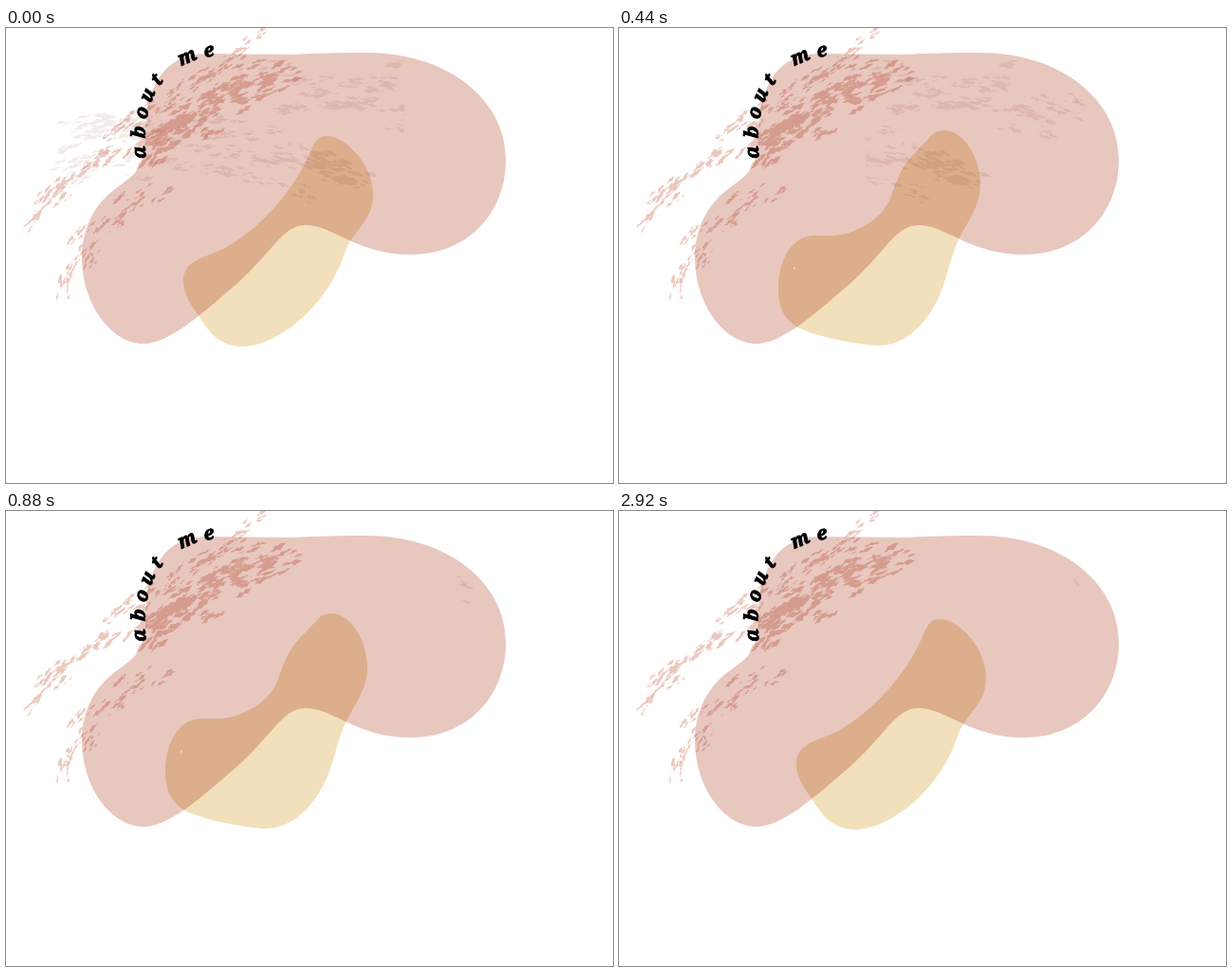
These frames come from a looping animation (640x480 px, 2.96 s). An HTML page with a canvas:

```html
<!DOCTYPE html>
<html lang="en">
<head>
<meta charset="utf-8">
<title>about me</title>
<style>
  html, body { margin: 0; width: 100%; height: 100%; overflow: hidden; background: #fff; }
  canvas { display: block; }
</style>
</head>
<body>
<canvas id="stage" width="640" height="480"></canvas>
<script>
const ctx = document.getElementById('stage').getContext('2d');
const LOOP = 2960, STEP = 40, WIPE_SPEED = 0.49;
const PINK = '#e8c7bf', YELLOW = '#f2dfbb', GREY = '#f3ebe8', RED = '#ebc8be';

const pinkBlob = new Path2D(`M300 28C345 26 365 26 380 26C465 26 527 75 527 139
  C527 195 487 239 427 239C370 239 345 208 316 208C291 208 281 237 242 271
  C206 302 172 333 145 333C110 333 80 290 80 242C80 207 97 183 116 169
  C136 155 147 147 147 115C147 60 168 27 212 27C240 27 270 28 300 28Z`);
const leanBlob = new Path2D(`M338 114C358 114 387 144 387 176C387 205 365 213 356 240
  C338 294 286 336 249 336C224 336 212 318 203 303C196 294 187 281 187 266
  C187 245 213 241 231 232C267 212 301 174 318 137C323 126 326 114 338 114Z`);
const wideBlob = new Path2D(`M343 108C363 108 381 136 381 165C381 190 366 205 356 228
  C346 251 345 276 327 302C314 320 297 335 273 335C250 334 212 326 196 319
  C178 312 168 300 168 275C168 245 182 219 206 219C220 219 230 220 243 216
  C262 208 278 200 287 177C293 160 299 145 309 135L328 115C332 110 337 108 343 108Z`);

// Point and direction on a Bezier curve of any degree
function onCurve(points, t) {
  while (points.length > 2) {
    points = points.slice(1).map(([x, y], i) => {
      const [px, py] = points[i];
      return [px + (x - px) * t, py + (y - py) * t];
    });
  }
  const [[ax, ay], [bx, by]] = points;
  return {
    x: ax + (bx - ax) * t,
    y: ay + (by - ay) * t,
    angle: Math.atan2(by - ay, bx - ax)
  };
}

function randomFrom(seed) {
  return () => (seed = (seed * 16807) % 2147483647) / 2147483647;
}

// A ragged sliver, pointed at both ends
function fleck(x, y, length, angle, random) {
  const path = new Path2D(), n = 6;
  for (let i = 0; i < 2 * n; i++) {
    const top = i <= n, u = (top ? i : 2 * n - i) / n;
    const along = (u - 0.5) * length;
    const across = (top ? -1 : 1) * Math.sin(Math.PI * u) * length * 0.2 * random();
    path.lineTo(x + along * Math.cos(angle) - across * Math.sin(angle),
      y + along * Math.sin(angle) + across * Math.cos(angle));
  }
  path.closePath();
  return path;
}

// Dry brush: clumps of flecks scattered along a curve
function brushStroke(path, points, { width, clumps, size }, random) {
  const spread = () => random() + random() - 1;
  for (let i = 0; i < clumps; i++) {
    const { x, y, angle } = onCurve(points, (i + random()) / clumps);
    const c = Math.cos(angle), s = Math.sin(angle), offset = spread() * width;
    for (let j = 0; j < 6; j++) {
      const along = spread() * size * 1.6, across = offset + spread() * size * 0.5;
      path.addPath(fleck(x + along * c - across * s, y + along * s + across * c,
        size * (0.3 + random()), angle + spread() * 0.25, random));
    }
  }
}

const random = randomFrom(71);
const redBrush = new Path2D(), greyBrush = new Path2D();
brushStroke(redBrush, [[28, 205], [100, 115], [270, 12]], { width: 20, clumps: 32, size: 11 }, random);
brushStroke(redBrush, [[140, 128], [195, 78], [288, 45]], { width: 28, clumps: 36, size: 16 }, random);
brushStroke(redBrush, [[62, 280], [70, 220], [160, 168]], { width: 20, clumps: 20, size: 10 }, random);
brushStroke(greyBrush, [[70, 105], [132, 98]], { width: 16, clumps: 9, size: 16 }, random);
brushStroke(greyBrush, [[50, 155], [190, 100], [330, 145]], { width: 44, clumps: 42, size: 13 }, random);
brushStroke(greyBrush, [[320, 145], [370, 158]], { width: 16, clumps: 10, size: 15 }, random);
brushStroke(greyBrush, [[285, 65], [380, 55], [480, 85]], { width: 40, clumps: 30, size: 13 }, random);
const lastFleck = new Path2D('M479 72L483 74L486 80L482 78Z');

function fill(path, color) {
  ctx.fillStyle = color;
  ctx.fill(path);
}

function drawGrey(t) {
  const tail = 45 + WIPE_SPEED * t, front = Math.min(420 + WIPE_SPEED * t, 493);
  ctx.save();
  ctx.beginPath();
  ctx.rect(tail, 34, Math.max(0, front - tail), 300);
  ctx.clip();
  fill(greyBrush, GREY);
  ctx.restore();
  if (front > 486) fill(lastFleck, GREY);
}

function drawTitle() {
  const title = 'about me', arc = [[142, 131], [138, 80], [156, 36], [214, 25]];
  ctx.fillStyle = ctx.strokeStyle = '#000';
  ctx.font = 'italic 900 20px "Noto Serif", serif';
  ctx.textAlign = 'center';
  [...title].forEach((letter, i) => {
    const { x, y, angle } = onCurve(arc, i / (title.length - 1));
    ctx.save();
    ctx.translate(x, y);
    ctx.rotate(angle);
    ctx.fillText(letter, 0, 5);
    ctx.strokeText(letter, 0, 5);
    ctx.restore();
  });
}

function draw(t) {
  const wide = (t >= 360 && t < 1040) || (t >= 2240 && t < 2920);
  ctx.globalCompositeOperation = 'source-over';
  ctx.fillStyle = '#fff';
  ctx.fillRect(0, 0, 640, 480);
  ctx.globalCompositeOperation = 'multiply';
  fill(pinkBlob, PINK);
  fill(wide ? wideBlob : leanBlob, YELLOW);
  fill(redBrush, RED);
  drawGrey(t);
  ctx.globalCompositeOperation = 'source-over';
  if (wide) {
    ctx.fillStyle = YELLOW;
    ctx.fillRect(184, 252, 1.5, 3);
  }
  drawTitle();
}

const start = performance.now();
function frame() {
  const t = (performance.now() - start) % LOOP;
  draw(Math.floor(t / STEP) * STEP);
  requestAnimationFrame(frame);
}
frame();
</script>
</body>
</html>
```
